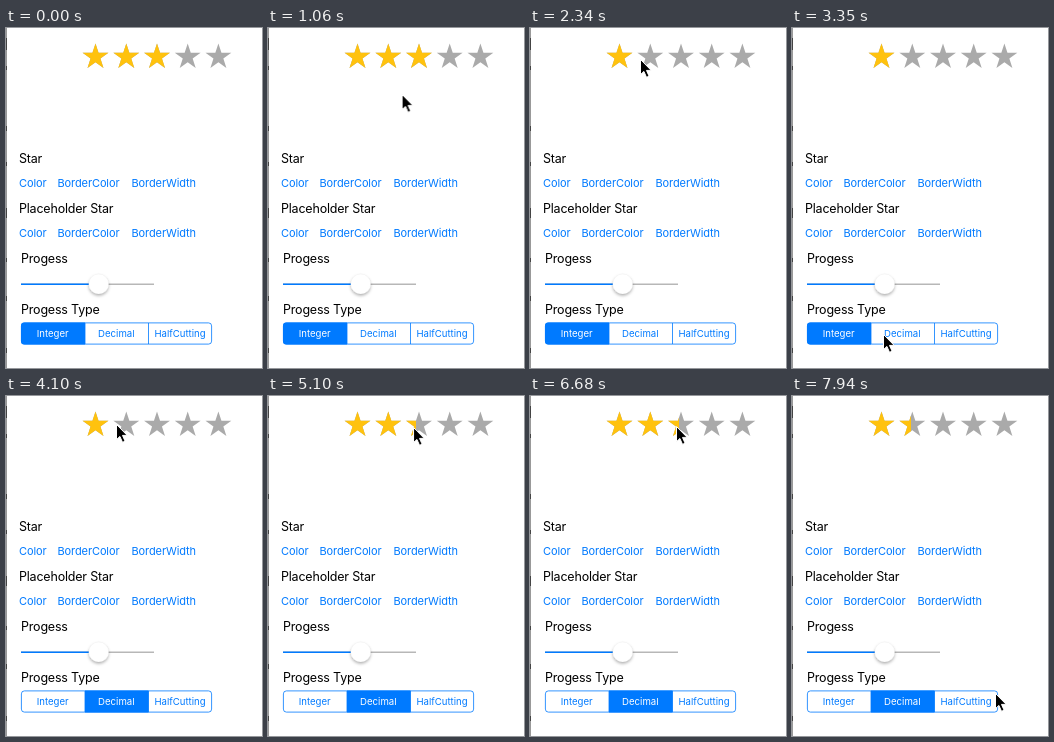
An HTML page for the animation above (8 s loop, 256x340 px).

```html
<!DOCTYPE html>
<html lang="en">
<head>
<meta charset="utf-8">
<title>Star rating demo</title>
<style>
html, body { margin: 0; width: 100%; height: 100%; overflow: hidden; background: #fff; }
svg { position: absolute; left: 0; top: 0; display: block; }
text { font-family: Inter, Roboto, sans-serif; }
.label { font-size: 12.5px; letter-spacing: -.2px; fill: #000; }
.link { font-size: 11px; letter-spacing: -.1px; fill: #007aff; }
.seg { font-size: 9.6px; text-anchor: middle; }

#fill { position: absolute; left: 0; top: 0; height: 60px; overflow: hidden; animation: fill 8s linear infinite; }
#cursor { animation: move 8s linear infinite; }
.to-white { animation: to-white 8s step-end infinite; }
.to-blue { animation: to-blue 8s step-end infinite; }

@keyframes to-white { 0% { fill: #007aff } 43.375%, 100% { fill: #fff } }
@keyframes to-blue { 0% { fill: #fff } 43.375%, 100% { fill: #007aff } }

/* whole stars jump while "Integer" is on, then the edge follows the pointer */
@keyframes fill {
  0% { width: 166px; animation-timing-function: step-end }
  16.125% { width: 105px; animation-timing-function: step-end }
  16.875% { width: 136px; animation-timing-function: step-end }
  18.875% { width: 166px; animation-timing-function: step-end }
  20.375% { width: 197px; animation-timing-function: step-end }
  24.125% { width: 166px; animation-timing-function: step-end }
  25.625% { width: 136px; animation-timing-function: step-end }
  28.5% { width: 105px; animation-timing-function: step-end }
  53.5% { width: 112px }
  63% { width: 145px }
  63.75% { width: 147.5px }
  73.25% { width: 184px }
  77.5% { width: 197px }
  83.5% { width: 149px }
  90.75%, 100% { width: 119px }
}

@keyframes move {
  0%, 5.9% { transform: translate(230px, 345px) }
  6% { transform: translate(222px, 322px) }
  10% { transform: translate(190px, 150px) }
  14.625%, 16.125% { transform: translate(110px, 31px) }
  17.625% { transform: translate(122px, 31px) }
  19.125% { transform: translate(150px, 31px) }
  20.625% { transform: translate(180px, 31px) }
  22.125% { transform: translate(189px, 31px) }
  23.375% { transform: translate(178px, 30px) }
  25.625% { transform: translate(141px, 31px) }
  29.25%, 36.75% { transform: translate(110px, 31px) }
  40.375% { transform: translate(90px, 318px) }
  41.875%, 43.375% { transform: translate(91px, 306px) }
  46.25% { transform: translate(176px, 96px) }
  49% { transform: translate(126px, 40px) }
  51.25%, 53.5% { transform: translate(110px, 28px) }
  63% { transform: translate(143px, 31px) }
  63.75% { transform: translate(145px, 31px) }
  73.25% { transform: translate(182px, 31px) }
  77.5% { transform: translate(194px, 31px) }
  83.5% { transform: translate(146px, 30px) }
  90.75%, 93% { transform: translate(116px, 31px) }
  99.25%, 100% { transform: translate(203px, 297px) }
}
</style>
</head>
<body>
<svg width="256" height="340" viewBox="0 0 256 340">
  <defs>
    <path id="star" d="M0-13.6 3.05-4.2 12.93-4.2 4.94 1.61 7.99 11 0 5.2-7.99 11-4.94 1.61-12.93-4.2-3.05-4.2Z"/>
    <g id="row">
      <use href="#star" x="89.5" y="29"/>
      <use href="#star" x="120.3" y="29"/>
      <use href="#star" x="151" y="29"/>
      <use href="#star" x="181.7" y="29"/>
      <use href="#star" x="212.4" y="29"/>
    </g>
    <filter id="shade" x="-50%" y="-50%" width="200%" height="200%">
      <feDropShadow dx="0" dy="1.8" stdDeviation="1.6" flood-opacity=".3"/>
    </filter>
    <clipPath id="round"><rect x="15" y="294.5" width="191" height="22" rx="3"/></clipPath>
  </defs>

  <path d="M.5 0V340" stroke="#999"/>
  <path d="M.5 10V22M.5 38V42M.5 98V103M.5 134V138M.5 180V190M.5 230V234M.5 268V273M.5 320V325" stroke="#444"/>

  <use href="#row" fill="#aaa"/>

  <g class="label">
    <text x="13" y="134.5">Star</text>
    <text x="13" y="185">Placeholder Star</text>
    <text x="15" y="235">Progess</text>
    <text x="15" y="285.5">Progess Type</text>
  </g>
  <g class="link">
    <text x="13" y="159">Color</text>
    <text x="51.5" y="159">BorderColor</text>
    <text x="125.5" y="159">BorderWidth</text>
    <text x="13" y="209">Color</text>
    <text x="51.5" y="209">BorderColor</text>
    <text x="125.5" y="209">BorderWidth</text>
  </g>

  <path d="M15 256.2H148" stroke="#b7b7b7" stroke-width="1.5"/>
  <path d="M15 256.2H92" stroke="#007aff" stroke-width="1.5"/>
  <circle cx="92.7" cy="256" r="10" fill="#fff" stroke="#000" stroke-opacity=".06" stroke-width=".5" filter="url(#shade)"/>

  <g clip-path="url(#round)">
    <rect class="to-white" x="15" y="294" width="64" height="23"/>
    <rect class="to-blue" x="79" y="294" width="63.5" height="23"/>
  </g>
  <g fill="none" stroke="#007aff" stroke-width=".8">
    <rect x="15.4" y="294.9" width="190.2" height="21.2" rx="3"/>
    <path d="M79 295V316M142.5 295V316"/>
  </g>
  <g class="seg">
    <text class="to-blue" x="46.7" y="309">Integer</text>
    <text class="to-white" x="110.3" y="309">Decimal</text>
    <text x="174" y="309" fill="#007aff">HalfCutting</text>
  </g>
</svg>

<div id="fill"><svg width="256" height="60"><use href="#row" fill="#ffc20e"/></svg></div>

<svg width="256" height="340">
  <path id="cursor" d="M.5.5V15.6L3.9 12.4 6.5 18.3 9.1 17.2 6.5 11.4H11.2Z" stroke="#fff" stroke-width="1"/>
</svg>
</body>
</html>
```
